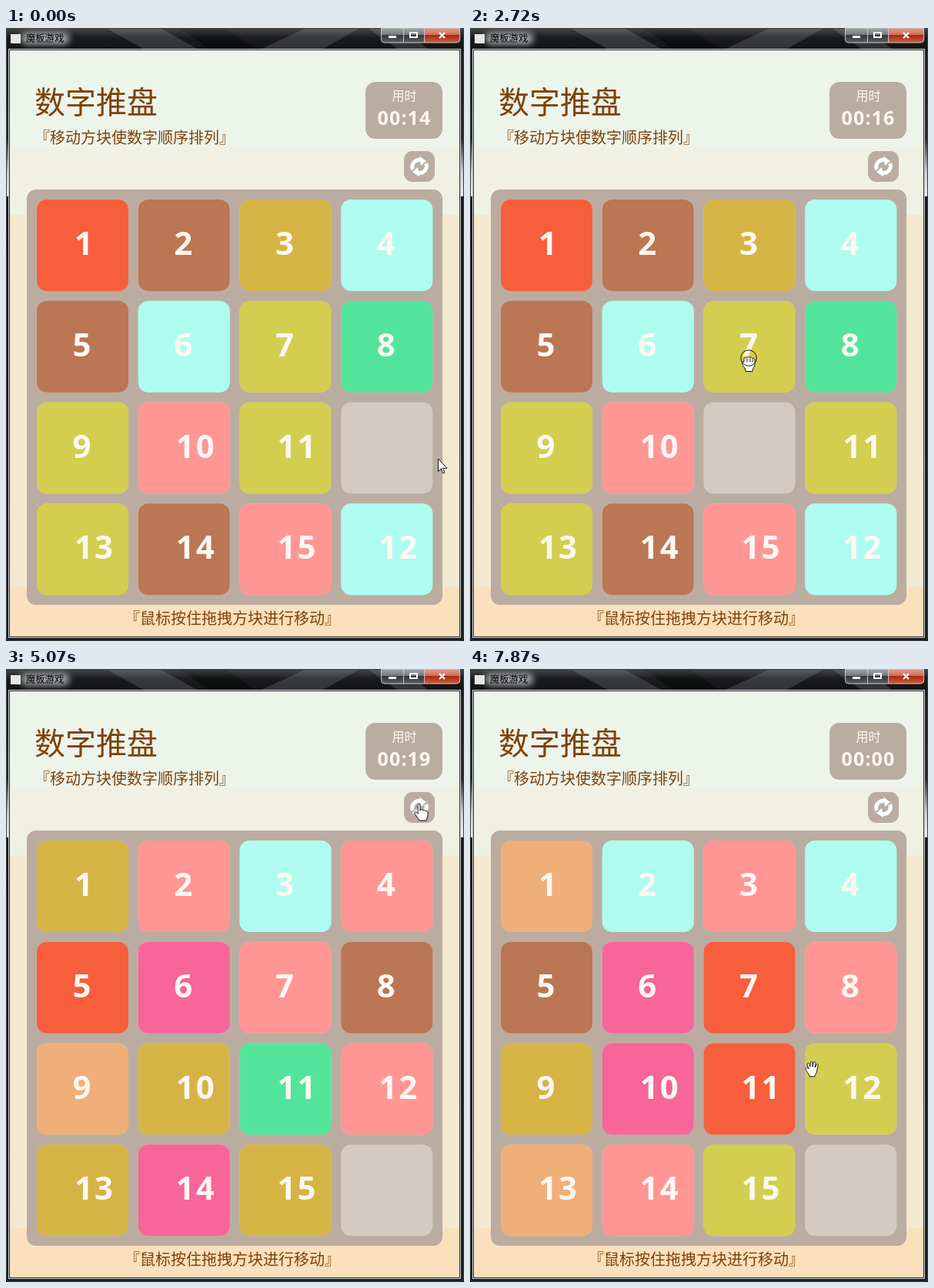
An HTML page that plays this animation: 595 px wide and 797 px high, repeating every 7990 ms.

```html
<!DOCTYPE html>
<html lang="zh-CN">
<head>
<meta charset="utf-8">
<title>魔板游戏</title>
<style>
  html, body { margin: 0; width: 100%; height: 100%; overflow: hidden; background: #111; }
  svg { display: block; width: 595px; height: 797px; }
  text { font-family: "Noto Sans CJK SC", "Noto Sans CJK", sans-serif; }
  .ink { fill: #7d4108; font-weight: 300; }
  .num { font: 700 42px "Noto Sans", "Open Sans", sans-serif; letter-spacing: 2px; fill: #fff7f2; }
  .clock { font: 700 25px "Noto Sans", "Open Sans", sans-serif; letter-spacing: 1.1px; fill: #fff7f2; }
  .panel { fill: #baaca0; }
  #cursor path { fill: #fff; stroke: #111; stroke-linejoin: round; stroke-linecap: round; }
</style>
</head>
<body>
<svg viewBox="0 0 595 797">
  <defs>
    <linearGradient id="bar" x2="0" y2="1">
      <stop offset="0" stop-color="#fff" stop-opacity=".22"/>
      <stop offset=".45" stop-color="#fff" stop-opacity=".04"/>
      <stop offset="1" stop-color="#fff" stop-opacity="0"/>
    </linearGradient>
    <linearGradient id="side" x2="0" y2="1">
      <stop offset="0" stop-color="#17181a"/>
      <stop offset=".18" stop-color="#26272a"/>
      <stop offset=".235" stop-color="#c9cacc"/>
      <stop offset=".274" stop-color="#eceded"/>
      <stop offset=".275" stop-color="#141517"/>
      <stop offset="1" stop-color="#1b1c1e"/>
    </linearGradient>
    <linearGradient id="grey" x2="0" y2="1">
      <stop offset="0" stop-color="#a5a7aa"/><stop offset=".48" stop-color="#74777b"/>
      <stop offset=".5" stop-color="#33363a"/><stop offset="1" stop-color="#5b5e62"/>
    </linearGradient>
    <linearGradient id="red" x2="0" y2="1">
      <stop offset="0" stop-color="#e3a090"/><stop offset=".48" stop-color="#cb6a55"/>
      <stop offset=".5" stop-color="#a92a12"/><stop offset="1" stop-color="#cf5a3a"/>
    </linearGradient>
    <filter id="soft" x="-30%" y="-100%" width="160%" height="300%"><feGaussianBlur stdDeviation="4"/></filter>
    <clipPath id="client"><rect x="5" y="29" width="584" height="762"/></clipPath>
  </defs>

  <rect width="595" height="797" fill="url(#side)"/>
  <rect width="595" height="28" fill="#121315"/>
  <path d="M130 0h70l50 28h-70zM330 28l60-28h70l-50 28zM470 0h40l40 28h-40z" fill="#303236"/>
  <path d="M225 0h60l40 28h-60z" fill="#08090a"/>
  <rect width="595" height="28" fill="url(#bar)"/>
  <rect x=".5" y=".5" width="594" height="796" rx="5" fill="none" stroke="#3a3c3f"/>
  <rect x="20" y="6" width="62" height="15" rx="7" fill="#a9abad" filter="url(#soft)"/>
  <rect x="6" y="8" width="13" height="12" fill="#e3e8e6"/>
  <text x="26" y="18" font-size="12.3" fill="#000">魔板游戏</text>

  <g stroke="#c4c6c8" stroke-width="1">
    <path d="M487.500 0V15q0 4 4 4H516.500V0z" fill="url(#grey)"/>
    <path d="M516.500 0H543.500V19H516.500z" fill="url(#grey)"/>
    <path d="M543.500 0H589.500V15q0 4-4 4H543.500z" fill="url(#red)"/>
  </g>
  <rect x="497" y="10" width="10" height="3" fill="#fff"/>
  <rect x="525" y="6" width="9" height="6" fill="none" stroke="#fff" stroke-width="2"/>
  <path d="M563 6l7 7m0-7l-7 7" stroke="#fff" stroke-width="2.200"/>

  <rect x="3.500" y="27.500" width="587" height="765" fill="none" stroke="#d7d9da"/>
  <rect x="4.500" y="28.500" width="585" height="763" fill="none" stroke="#26282a"/>
  <g clip-path="url(#client)">
    <rect x="5" y="29" width="584" height="126" fill="#edf4ea"/>
    <rect x="5" y="155" width="584" height="88" fill="#f0f1e3"/>
    <rect x="5" y="243" width="584" height="484" fill="#f4e9d0"/>
    <rect x="5" y="727" width="584" height="64" fill="#fae0bc"/>

    <text class="ink" x="37" y="111" font-size="40">数字推盘</text>
    <text class="ink" x="37" y="150" font-size="20">『移动方块使数字顺序排列』</text>
    <text class="ink" x="154" y="775" font-size="20">『鼠标按住拖拽方块进行移动』</text>

    <rect class="panel" x="467" y="70" width="100" height="74" rx="13"/>
    <text x="501.500" y="94" font-size="16" font-weight="300" fill="#fff7f2">用时</text>
    <text class="clock" id="clock" x="517.500" y="126" text-anchor="middle">00:14</text>

    <rect class="panel" x="517" y="160" width="40" height="40" rx="11"/>
    <g transform="translate(537 180)" fill="#fff">
      <g id="arc">
        <path d="M-8.500 4A9 9 0 0 1 1-8.500" fill="none" stroke="#fff" stroke-width="5"/>
        <path d="M0-13.500L9-7L2-1z"/>
      </g>
      <use href="#arc" transform="rotate(180)"/>
    </g>

    <rect class="panel" x="27" y="210" width="540" height="540" rx="12"/>
    <g id="slots" fill="#d4cac1"></g>
    <g id="tiles"></g>
  </g>

  <g id="cursor">
    <path id="arrow" d="M.5.5V16.500L4.300 13L6.800 19L9 18L6.500 12.300H11.500Z"/>
    <path id="open" d="M-3 11.500C-5 6-8 4-8 1.500C-7-.5-5 0-4 2L-6-4C-6-6-4-6-3-4L-2-1V-6C-2-8 1-8 1-6V-1L2-6C3-8 5-7 5-5L4 0L6-3C7-5 9-4 8-2C7 2 7 6 4 11.500Z"/>
    <g id="grab">
      <path d="M-4 17L-5 13C-8 10-9 7-8 5L-6 5V1C-5-2-3-1-2 0C-1-2 1-2 2 0C3-2 5-1 5 1C7 0 8 1 8 3V8C8 11 5 13 5 17Z"/>
      <path d="M-2 1V5M2 1V5M5 2V5"/>
    </g>
    <path id="point" d="M-2 1C-2-1 1-1 1 1V8C2 6 4 7 5 8C6 7 8 8 8 9C10 8 11 9 11 11V15L9 21H0L-6 12C-7 9-4 9-2 12Z"/>
    <circle id="ring" r="10.300" fill="none" stroke="#111"/>
  </g>
</svg>

<script>
const LOOP = 7990, PITCH = 131.75, SIZE = 119;
const $ = id => document.getElementById(id);
const COLORS = {
  R: '#f75e3b', B: '#bb7653', G: '#d5b445', C: '#aefcf0', O: '#d3ce4f',
  E: '#52e49b', P: '#ff9694', H: '#f86599', S: '#f0af78'
};

// start time and tile colours of each shuffle
const BOARDS = [
  [0, 'RBGCBCOEOPOCOBP'],
  [5070, 'GPCPRHPBSGEPGHG'],
  [6000, 'CSPGOBRHPCSOEPB'],
  [6580, 'PCBOHPPSBRRSRSR'],
  [7570, 'SCPCBHRPGHROSPO']
];

// tile, grab time, release time, cells before and after, grip point
const DRAGS = [
  { n: 11, from: 610, to: 2160, a: 10, b: 11, dx: 82, dy: 64 },
  { n: 7, from: 2715, to: 3225, a: 6, b: 10, dx: 58.5, dy: 74 },
  { n: 8, from: 3485, to: 4025, a: 7, b: 6, dx: 65, dy: 65 }
];

// screen refreshes: first, last, count
const REFRESH = [
  [0, 0, 1], [120, 240, 2], [610, 1610, 8], [1750, 2720, 8], [2840, 3750, 8],
  [3900, 4930, 9], [5070, 5070, 1], [5600, 5730, 2], [6000, 6000, 1],
  [6580, 6580, 1], [7020, 7290, 3], [7570, 7870, 3]
].flatMap(([a, b, n]) =>
  Array.from({ length: n }, (_, i) => a + (n > 1 ? i * (b - a) / (n - 1) : 0)));

// time, x, y, shape (* = pressed)
const PATH = `0 561 560 arrow|120 500 561 arrow|240 412 568 open|610 386 551 grab*
900 400 680 grab*|1038 350 765 grab*|1181 270 720 grab*|1400 290 600 grab*
1610 375 535 grab*|1750 407 532 grab*|1888 470 540 grab*|2027 517 551 grab*
2165 517 551 open|2581 362 430 open|2719 362 429 grab*|2840 362 440 grab*
3099 362 578 grab*|3229 365 562 open|3489 500 420 grab*|3619 455 412 grab*
3749 373 434 grab*|3900 338 454 grab*|4028 338 454 open|4157 338 454 open
4540 450 330 open|4800 537 176 point|4929 537 177 point*|5070 537 176 point
5600 537 177 point*|5729 537 176 point|7020 537 185 point|7154 537 195 point
7289 537 176 point|7570 537 175 point|7719 500 340 open|7869 444 518 open`
  .split(/[|\n]/).map(k => {
    const [t, x, y, shape] = k.trim().split(' ');
    return { t: +t, x: +x, y: +y, shape: shape.replace('*', ''), down: shape.endsWith('*') };
  });

const cell = i => [40 + i % 4 * PITCH, 223 + (i >> 2) * PITCH];
const lastAt = (list, t, time) => {
  let i = list.length - 1;
  while (i > 0 && time(list[i]) > t) i--;
  return i;
};

function add(parent, tag, attrs) {
  const el = document.createElementNS('http://www.w3.org/2000/svg', tag);
  for (const k in attrs) el.setAttribute(k, attrs[k]);
  return parent.appendChild(el);
}

for (let i = 0; i < 16; i++) {
  const [x, y] = cell(i);
  add($('slots'), 'rect', { x, y, width: SIZE, height: SIZE, rx: 13 });
}

// the three draggable tiles go last so they pass over the others
const order = [1, 2, 3, 4, 5, 6, 9, 10, 12, 13, 14, 15, 7, 8, 11];
const tiles = order.map(n => {
  const g = add($('tiles'), 'g', {});
  const face = add(g, 'rect', { width: SIZE, height: SIZE, rx: 13 });
  const lead = n === 1 || n > 9 ? 49 : 46.5;
  add(g, 'text', { class: 'num', x: lead, y: 72 }).textContent = n;
  return { n, g, face };
});

function cursorAt(t) {
  const i = lastAt(PATH, t, k => k.t), a = PATH[i], b = PATH[i + 1] || a;
  const f = b === a ? 0 : (t - a.t) / (b.t - a.t);
  return { ...a, x: a.x + (b.x - a.x) * f, y: a.y + (b.y - a.y) * f };
}

function place(n, t, cur) {
  if (t >= BOARDS[1][0]) return cell(n - 1);
  if (n === 12) return cell(15);
  const d = DRAGS.find(d => d.n === n);
  if (!d) return cell(n - 1);
  if (t < d.from) return cell(d.a);
  return t < d.to ? [cur.x - d.dx, cur.y - d.dy] : cell(d.b);
}

function draw(now) {
  const t = REFRESH[lastAt(REFRESH, now % LOOP, r => r)];
  const cur = cursorAt(t);
  const colors = BOARDS[lastAt(BOARDS, t, b => b[0])][1];
  for (const { n, g, face } of tiles) {
    g.setAttribute('transform', `translate(${place(n, t, cur)})`);
    face.setAttribute('fill', COLORS[colors[n - 1]]);
  }
  const secs = t >= 6000 ? 0 : Math.min(19, 14 + Math.floor((t + 105) / 1000));
  $('clock').textContent = '00:' + String(secs).padStart(2, '0');
  $('cursor').setAttribute('transform', `translate(${cur.x} ${cur.y})`);
  for (const id of ['arrow', 'open', 'grab', 'point'])
    $(id).style.display = id === cur.shape ? '' : 'none';
  $('ring').style.display = cur.down ? '' : 'none';
}

const start = performance.now();
function tick() {
  draw(performance.now() - start);
  requestAnimationFrame(tick);
}
tick();
</script>
</body>
</html>
```
